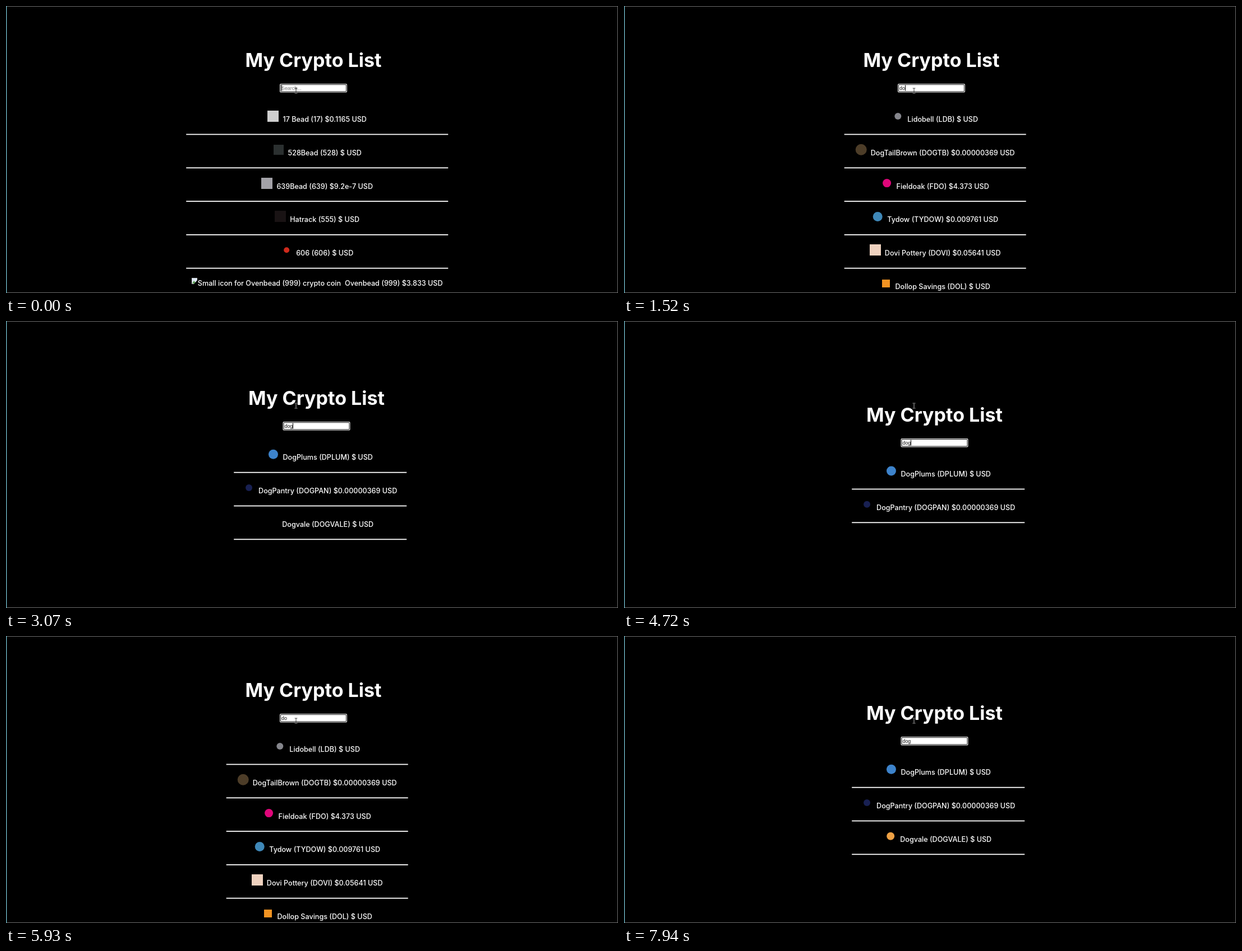
An HTML page with a canvas for the animation above (8 s loop, 1091 px wide and 513 px high).

```html
<!DOCTYPE html>
<html lang="en">
<head>
<meta charset="utf-8">
<title>My Crypto List</title>
<style>
  html, body { margin: 0; width: 100%; height: 100%; overflow: hidden; background: #000; }
  canvas { display: block; }
</style>
</head>
<body>
<canvas id="stage" width="1091" height="513"></canvas>
<script>
const W = 1091, H = 513, LOOP = 8000;
const ctx = document.getElementById('stage').getContext('2d');

const ROW_FONT = '500 12.6px Inter, sans-serif';
const TITLE_FONT = '700 34px Inter, sans-serif';
const INPUT_FONT = '8.9px "Liberation Sans", Arial, sans-serif';
const ICON = 20, GAP = 7, PITCH = 59.8, ALT_LOSS = 6;

// label, icon shape, icon colour, half size
const coins = {
  bead17: ['17 Bead (17)', 'square', '#cfcfcf', 10],
  bead528: ['528Bead (528)', 'square', '#2b3030', 9],
  bead639: ['639Bead (639)', 'square', '#a3a2a8', 10],
  ten: ['TenTwenty (020)', 'circle', '#e5a62f', 7],
  hat: ['Hatrack (555)', 'square', '#191314', 10],
  six: ['606 (606)', 'circle', '#cf2a1c', 5],
  oven: ['Ovenbead (999)', 'square', '#888', 8],
  plum: ['DogPlums (DPLUM)', 'circle', '#3d83cb', 8.5],
  pantry: ['DogPantry (DOGPAN)', 'circle', '#182052', 6],
  vale: ['Dogvale (DOGVALE)', 'circle', '#efa144', 7],
  lido: ['Lidobell (LDB)', 'circle', '#85868c', 6],
  tail: ['DogTailBrown (DOGTB)', 'circle', '#4d3d28', 10],
  field: ['Fieldoak (FDO)', 'circle', '#e0067a', 7.5],
  tydow: ['Tydow (TYDOW)', 'circle', '#3f88b8', 8.5],
  dovi: ['Dovi Pottery (DOVI)', 'square', '#efd2bf', 10],
  dollop: ['Dollop Savings (DOL)', 'square', '#f29322', 7]
};

// Icon states of a row: shown by default, 'none' while loading, 'alt' when broken
const openRows = [
  ['bead17', '0.1165'], ['bead528', ''], ['bead639', '9.2e-7'],
  ['hat', ''], ['six', ''], ['oven', '3.833', 'alt']
];
const nextRows = (price, icon) => [
  ['bead17', ''], ['bead528', '0.00000369'], ['bead639', '0.000003'],
  ['ten', price, icon], ['hat', ''], ['six', '']
];
const doRows = icon => [
  ['lido', '', icon], ['tail', '0.00000369', icon], ['field', '4.373', icon],
  ['tydow', '0.009761', icon], ['dovi', '0.05641', icon], ['dollop', '', icon]
];
const dRows = [
  ['tail', '0.00000369'], ['lido', ''], ['plum', ''],
  ['field', '4.373'], ['dovi', '0.05641'], ['tydow', '0.009761']
];
const dogRows = (second, third) => {
  const rows = [['plum', ''], ['pantry', '0.00000369', second]];
  if (third) rows.push(['vale', '', third]);
  return rows;
};

// start, typed text, rows, rule width, vertical shift
const scenes = [
  [0, '', openRows, 467, 0],
  [30, '', nextRows('0.006094', 'alt'), 499.5, 0],
  [520, '', nextRows(''), 499.5, 0],
  [1260, 'd', dRows, 396, 0],
  [1520, 'do', doRows(), 324, 0],
  [2050, 'dog', dogRows('none'), 308, 71],
  [2400, 'dog', dogRows(), 308, 71],
  [2690, 'dog', dogRows('', 'none'), 308, 41.2],
  [3350, 'dogp', dogRows(), 308, 71],
  [4720, 'dog', dogRows(), 308, 71],
  [4740, 'do', doRows('none'), 324, 0],
  [4850, 'do', doRows(), 324, 0],
  [6400, 'dog', dogRows('', 'none'), 308, 41.2],
  [6440, 'dog', dogRows('', 'shown'), 308, 41.2]
];

// Moments when the text caret turns on or off
const caretTimes = [
  [0, 1], [410, 0], [910, 1], [2560, 0], [3070, 1], [3860, 0], [4410, 1],
  [4950, 0], [5440, 1], [5930, 0], [6400, 1], [6880, 0], [7450, 1], [7940, 0]
];

const latest = (list, t) => list.filter(item => item[0] <= t).pop();

function box(x, y, w, h, color) {
  ctx.fillStyle = color;
  ctx.fillRect(x, y, w, h);
}

function text(str, x, y, font, color = '#fff') {
  ctx.font = font;
  ctx.fillStyle = color;
  ctx.fillText(str, x, y);
}

function width(str, font) {
  ctx.font = font;
  return ctx.measureText(str).width;
}

function drawIcon([, shape, color, r], x, y) {
  if (shape === 'square') return box(Math.round(x - r), Math.round(y - r), 2 * r, 2 * r, color);
  ctx.fillStyle = color;
  ctx.beginPath();
  ctx.arc(x, y, r, 0, Math.PI * 2);
  ctx.fill();
}

function drawBroken(x, y) {
  box(x, y, 10, 11, '#c8ccd0');
  box(x + 1, y + 1, 8, 9, '#dfeaf6');
  ctx.fillStyle = '#5b9c50';
  ctx.beginPath();
  ctx.moveTo(x + 1, y + 10);
  ctx.lineTo(x + 4, y + 5);
  ctx.lineTo(x + 8, y + 10);
  ctx.fill();
  ctx.fillStyle = '#000';
  ctx.beginPath();
  ctx.moveTo(x + 10, y + 4);
  ctx.lineTo(x + 10, y + 11);
  ctx.lineTo(x + 4, y + 11);
  ctx.fill();
}

function drawRows(rows, cx, ruleWidth, top) {
  let base = top;
  for (const [key, price, icon] of rows) {
    const coin = coins[key];
    const label = `${coin[0]} $${price} USD`;
    const alt = icon === 'alt' ? `Small icon for ${coin[0]} crypto coin` : '';
    const lead = alt ? 11 + width(alt, ROW_FONT) : ICON;
    const x = cx - (lead + GAP + width(label, ROW_FONT)) / 2;
    if (alt) {
      base -= ALT_LOSS;
      drawBroken(Math.round(x), Math.round(base) - 14);
      text(alt, x + 11, base, ROW_FONT);
    } else if (icon !== 'none') {
      drawIcon(coin, x + ICON / 2, base - ICON / 2);
    }
    text(label, x + lead + GAP, base, ROW_FONT);
    box(cx - ruleWidth / 2, base + 21.6, ruleWidth, 1.8, '#fff');
    base += PITCH;
  }
}

function rounded(x, y, w, h, r, color) {
  ctx.fillStyle = color;
  ctx.beginPath();
  ctx.roundRect(x, y, w, h, r);
  ctx.fill();
}

function drawInput(x, y, typed, caret) {
  rounded(x, y, 120, 15.5, 2, '#fff');
  rounded(x + 1, y + 1, 118, 13.5, 1.5, '#111');
  rounded(x + 2, y + 2, 116, 11.5, 0.5, '#fff');
  text(typed || 'Search...', x + 3, y + 11, INPUT_FONT, typed ? '#111' : '#777');
  if (caret) box(Math.round(x + 3 + width(typed, INPUT_FONT)), y + 2.5, 1, 10, '#000');
}

// Inverts what lies below, as the text pointer does
function drawPointer() {
  ctx.globalCompositeOperation = 'difference';
  box(516.5, 147, 1, 9, '#b8b8b8');
  box(514.5, 146.5, 5, 1, '#999');
  box(514.5, 155.5, 5, 1, '#999');
  ctx.globalCompositeOperation = 'source-over';
}

function drawEdges() {
  box(0, 0, W, 1, '#6f6f6f');
  box(0, H - 1, W, 1, '#6f6f6f');
  box(W - 1, 0, 1, H, '#6f6f6f');
  box(0, 0, 1.3, H, '#74bfd0');
}

function draw(t) {
  const [, typed, rows, ruleWidth, dy] = latest(scenes, t);
  const caret = latest(caretTimes, t)[1];
  const dx = dy ? 5.5 : 0; // no scrollbar on short lists
  box(0, 0, W, H, '#000');
  const title = 'My Crypto List';
  text(title, 548 + dx - width(title, TITLE_FONT) / 2, 108.5 + dy, TITLE_FONT);
  drawInput(488 + dx, Math.round(139 + dy), typed, caret);
  drawRows(rows, 554.7 + dx, ruleWidth, 207 + dy);
  drawPointer();
  drawEdges();
}

const start = performance.now();
function tick() {
  draw((performance.now() - start) % LOOP);
  requestAnimationFrame(tick);
}
tick();
</script>
</body>
</html>
```
